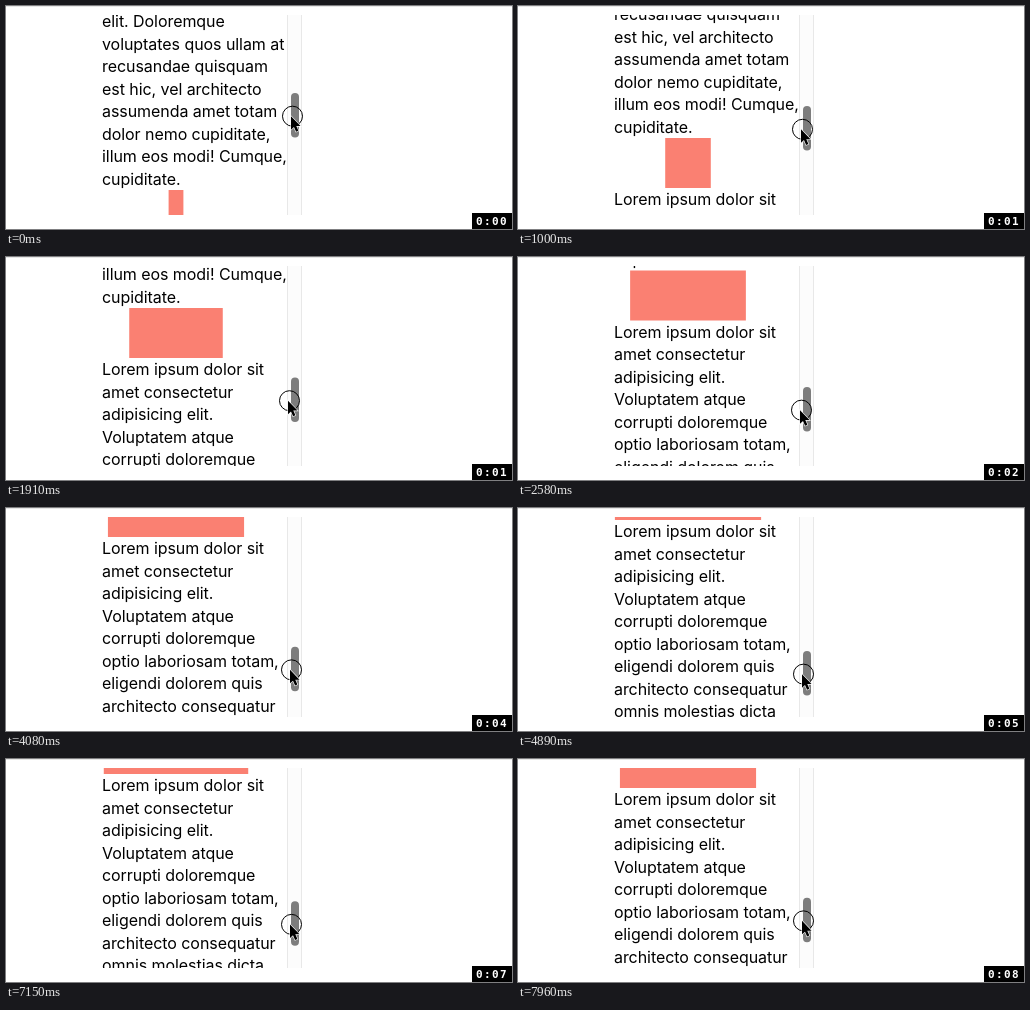
Animation of 506 by 223 pixels, one loop 7.99 s. Source, as an HTML page:

```html
<!DOCTYPE html>
<html lang="en">
<head>
<meta charset="utf-8">
<title>Scroll-driven box</title>
<style>
  html, body { margin: 0; width: 100%; height: 100%; overflow: hidden; background: #fff; }
  svg { display: block; width: 506px; height: 223px; }
  .copy { font: 16px Inter, "Noto Sans", sans-serif; letter-spacing: -.06px; fill: #000; }
  .clock { font: bold 11px "DejaVu Sans Mono", monospace; letter-spacing: 1.4px; fill: #fff; }
</style>
</head>
<body>
<svg viewBox="0 0 506 223">
  <defs><clipPath id="view"><rect x="96" y="9" width="200" height="200"/></clipPath></defs>
  <rect width="506" height="223" fill="#fff"/>
  <rect width="506" height="1" fill="#e6e6e6"/>
  <g clip-path="url(#view)">
    <g id="content" class="copy"><rect id="box" height="50" fill="#fa8072"/></g>
  </g>
  <rect x="281" y="9" width="15" height="200" fill="#fcfcfc"/>
  <path d="M281.5 9V209M295.5 9V209" stroke="#e8e8e8"/>
  <rect id="thumb" x="285" width="8" height="44.5" rx="4" fill="#7d7d7d"/>
  <g id="pointer">
    <circle r="10" fill="none" stroke="#000"/>
    <path d="M-1.5 0V13.5L1.5 10.8L3.6 15.6L5.9 14.6L3.8 9.9H8Z" fill="#000" stroke="#fff" stroke-width="1.2" paint-order="stroke"/>
  </g>
  <rect x="466" y="207" width="40" height="16" fill="#000"/>
  <text id="clock" class="clock" x="470" y="218.5"></text>
</svg>
<script>
const LOOP = 7990, LINE = 22.5, ASCENT = 17;
const VIEW_TOP = 9, VIEW_H = 200, BOX_TOP = 184, BOX_H = 50, BOX_W = 148;

const before = ["elit. Doloremque", "voluptates quos ullam at", "recusandae quisquam",
  "est hic, vel architecto", "assumenda amet totam", "dolor nemo cupiditate,",
  "illum eos modi! Cumque,", "cupiditate."];
const after = ["Lorem ipsum dolor sit", "amet consectetur", "adipisicing elit.",
  "Voluptatem atque", "corrupti doloremque", "optio laboriosam totam,",
  "eligendi dolorem quis", "architecto consequatur", "omnis molestias dicta"];

// [time, scroll offset]
const scrollKeys = [[0, 0], [810, 40], [1000, 52], [1650, 112], [1910, 133], [2580, 170.5],
  [3090, 186], [3270, 187], [4080, 205], [4170, 205], [4800, 221], [4890, 222],
  [5200, 227], [5520, 227], [5580, 228.5], [5820, 228.5], [5850, 230], [6420, 230],
  [6430, 229], [6640, 229], [6850, 220], [7130, 220], [7240, 216], [7430, 216],
  [7650, 210], [7780, 210], [7960, 205]];
// [time, pointer x]
const pointerKeys = [[0, 286.5], [1000, 284.5], [1910, 283.5], [2580, 283.5],
  [4080, 285.5], [7990, 285.5]];

const $ = id => document.getElementById(id);
const content = $("content"), box = $("box"), thumb = $("thumb"),
  pointer = $("pointer"), clock = $("clock");

function addLines(lines, top) {
  lines.forEach((line, i) => {
    const el = document.createElementNS("http://www.w3.org/2000/svg", "text");
    el.setAttribute("x", 96);
    el.setAttribute("y", top + i * LINE + ASCENT);
    el.textContent = line;
    content.append(el);
  });
}

function sample(keys, t) {
  const i = keys.findIndex(k => k[0] > t);
  if (i < 0) return keys[keys.length - 1][1];
  const [t0, a] = keys[i - 1], [t1, b] = keys[i];
  return a + (b - a) * (t - t0) / (t1 - t0);
}

function draw(t) {
  const scroll = Math.round(sample(scrollKeys, t) * 2) / 2;
  const drag = scroll * 0.252;
  const progress = (VIEW_TOP + VIEW_H - BOX_TOP + scroll) / (VIEW_H + BOX_H);
  const width = BOX_W * Math.min(1, progress);

  content.setAttribute("transform", `translate(0 ${-scroll})`);
  box.setAttribute("x", 96 + (BOX_W - width) / 2);
  box.setAttribute("width", width);
  thumb.setAttribute("y", 87 + drag);
  pointer.setAttribute("transform", `translate(${sample(pointerKeys, t)} ${110.2 + drag})`);
  clock.textContent = "0:0" + Math.floor(t / 975);
}

box.setAttribute("y", BOX_TOP);
addLines(before, BOX_TOP - before.length * LINE);
addLines(after, BOX_TOP + BOX_H);

const start = performance.now();
function tick() {
  draw((performance.now() - start) % LOOP);
  requestAnimationFrame(tick);
}
draw(0);
requestAnimationFrame(tick);
</script>
</body>
</html>
```
